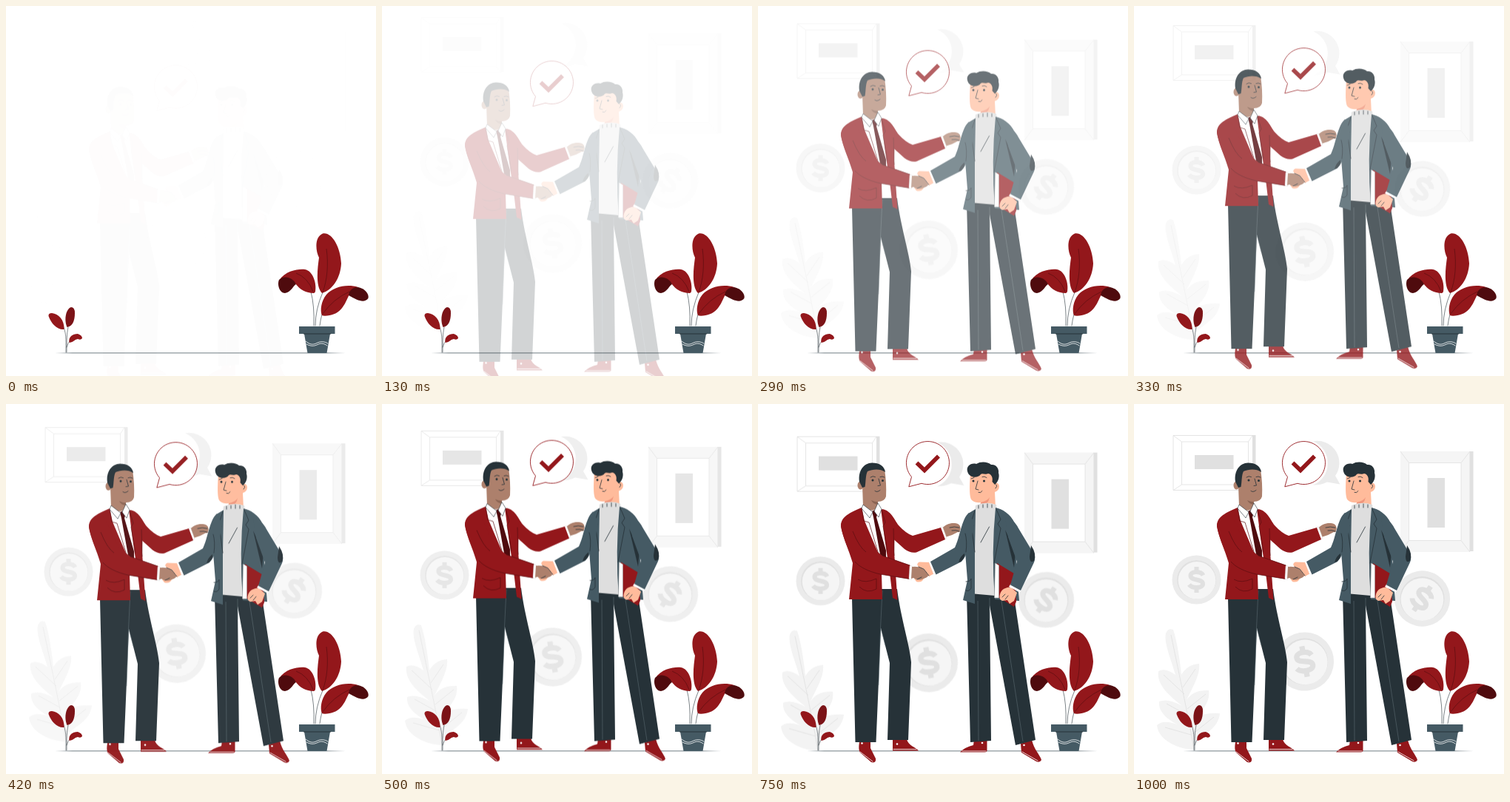
An HTML page for the animation above (1.04 s loop, 500 by 500 pixels).

```html
<!DOCTYPE html>
<html lang="en">
<head>
<meta charset="utf-8">
<title>Handshake</title>
<style>
  html, body { margin: 0; width: 100%; height: 100%; overflow: hidden; background: #fff; }
  svg { display: block; width: 100%; height: 100%; }

  /* The script sets --t, the time in seconds, so both slides follow one clock. */
  .slide {
    animation: slide var(--length) cubic-bezier(.36, -.01, .5, 1.38) calc(var(--t, 0) * -1s) paused both;
  }
  .scenery { --from: -30px; --length: 1s; }
  .people { --from: 30px; --length: .7s; }
  @keyframes slide {
    from { opacity: 0; transform: translateY(var(--from)); }
    to { opacity: 1; transform: translateY(0); }
  }

  .red { fill: #93171b; }
  .deep { fill: #4f0b0e; }
  .dark { fill: #263238; }
  .slate { fill: #455a64; }
  .brown { fill: #ad806c; }
  .peach { fill: #ffbb9b; }
  .white { fill: #fff; }
  .pale { fill: #e0e0e0; }
  .line { fill: none; stroke: #263238; stroke-width: .8; stroke-linecap: round; }
  .seam { fill: none; stroke: #5b6a71; stroke-width: .6; }
  .fold { fill: none; stroke: #5b0e11; stroke-width: .7; }
  .edge { fill: none; stroke: #e0e0e0; stroke-width: .8; }
</style>
</head>
<body>
<svg viewBox="0 0 500 500">
  <defs>
    <g id="dollar" fill="none" stroke="#e0e0e0" stroke-width="6">
      <path d="M9 -6C6-12-8-12-8-5.500C-8 2 8.500-2 8.500 5.500C8.500 12-6 12-10 6.500M0-17.500V-9M0 9V17.500"/>
    </g>
    <g id="coin">
      <circle r="33" fill="#ebebeb"/>
      <circle r="26.3" class="pale"/>
      <circle cx=".5" cy=".8" r="25.3" fill="#f5f5f5"/>
    </g>
  </defs>

  <g class="slide scenery">
    <!-- picture frames -->
    <path class="white" stroke="#e4e4e4" d="M53 42.5H161V116.5H53Z"/>
    <path class="pale" d="M160 42H164.5V116H160Z"/>
    <path class="edge" d="M64.5 51H154.5V109H64.5ZM53 42.5L64.5 51M160 42.5L154.5 51M53 116.5L64.5 109M160 116.5L154.5 109"/>
    <path class="pale" d="M82 69H134.5V88H82Z"/>
    <path fill="#f5f5f5" d="M360 64H454V200H360Z"/>
    <path class="pale" d="M453.5 64H458.5V199H453.5Z"/>
    <path class="white" d="M371.5 79.5H442V184.5H371.5Z"/>
    <path class="edge" d="M371.5 79.5H442V184.5H371.5ZM360 64L371.5 79.5M454 64L442 79.5M360 200L371.5 184.5M454 200L442 184.5"/>
    <path class="pale" d="M396.5 100H420V167H396.5Z"/>

    <path fill="#ebebeb" d="M242 50.3A30 30 0 0 1 272 97L278.5 108.5L261 105.5Q252 110 242 109.5A32 32 0 0 0 242 50.3Z"/>

    <!-- coins -->
    <g transform="translate(84.5 237.5)">
      <use href="#coin"/><use href="#dollar"/>
    </g>
    <g transform="translate(230.5 348) rotate(-10) scale(1.2)">
      <use href="#coin"/><use href="#dollar"/>
    </g>
    <g transform="translate(389.5 263) rotate(35) scale(1.14)">
      <use href="#coin"/><use href="#dollar"/>
    </g>

    <!-- pale plant -->
    <path fill="#f3f3f3" d="M80 467C60 466 33 455 31 434Q42 424 67 437C50 430 32 418 34 402Q46 397 65 408C50 396 30 380 33 361Q42 356 56 366C50 345 40 322 43 310Q46 302 53 305C58 320 62 345 64 366Q72 352 88 351C90 366 78 385 71 400Q80 386 101 387C104 404 88 420 76 430Q90 416 116 418C114 440 92 446 81 460Z"/>
    <path class="edge" d="M81 467C75 430 62 370 50 312M77 447L42 437M73 421L44 405M68 392L40 366M66 383L83 358M72 412L97 392M79 446L108 423"/>
  </g>

  <path fill="#8b969b" d="M66 469L90 468.3H430L459 469L430 469.5H90Z"/>

  <!-- small red plant -->
  <path class="line" stroke-opacity=".7" d="M81 468C81 455 82 445 78 434M82 468C82 450 82 445 84 434M82 461Q84 454 87 452"/>
  <path class="red" d="M78.5 437C69 438 61 429 57.5 419Q57 415 62 415C71 416 79 424 78.5 437Z"/>
  <path fill="#7b1317" d="M82.5 434C78 424 81 409 88 407Q93 407 93 415C93 425 90 433 82.5 434Z"/>
  <path class="red" d="M85.5 455C84 447 90 443 97 443Q103 445 103 449Q101 452 97 450C92 451 92 454 85.5 455Z"/>

  <!-- potted plant -->
  <path class="line" stroke-opacity=".75" d="M416 432Q417 405 412 386M418 432Q418 410 428 387M424 432Q426 415 432 404"/>
  <path class="red" d="M427 388C418 378 421 355 423 340C418 330 417 312 428 307.5C440 305 452 325 453 348C452 368 441 384 427 388Z"/>
  <path class="red" d="M416 388C405 388 397 383 391 375C384 369 372 367 369 371C378 357 396 355 404 356C415 358 420 375 418 386Q417 388 416 388Z"/>
  <path class="deep" d="M369 370C366 377 370 388 377 388C385 387 388 378 392 376C388 367 376 363 369 370Z"/>
  <path class="red" d="M427 418C424 412 426 398 433 390C442 380 460 375 476 380C468 383 464 390 462 394C458 402 453 417 434 418.5Q429 419 427 418Z"/>
  <path class="deep" d="M463 391C464 384 468 380 476 380C485 382 491 389 489.5 395C484 402 475 398 463 391Z"/>
  <path class="fold" d="M428 387C434 370 436 350 433 328M415 386Q408 367 392 361M428 416Q442 396 464 386"/>
  <path class="slate" d="M396 433H444.5V443H396ZM403 443H438L433.5 469H407.5Z"/>
  <path class="dark" d="M402 442.4H439V443.4H402Z"/>
  <path class="line" style="stroke:#fff" d="M405 453C411 458 415 458 420 455.5S430 453 435 456M406 457C412 460 416 460 421 457.5S430 456 434 459"/>

  <g class="slide people">
    <!-- speech bubble -->
    <path class="white" stroke="#93171b" stroke-width=".9" d="M207.5 98.5A29 29 0 1 1 221 107.3L203.8 111.8Z"/>
    <path fill="none" stroke="#93171b" stroke-width="5.6" d="M214.5 79.5L225 89.5L244 70.5"/>

    <!-- man on the left: far arm and legs -->
    <path class="brown" d="M249 168C254 161 265 159.500 271 162.5Q275 166 273 171Q273 174 270 173Q262 178 253 180Z"/>
    <path class="line" stroke-width=".6" d="M259 167Q265 165 272 167M262 171Q267 170 272 172"/>
    <path class="white" stroke="#ccc" stroke-width=".4" d="M246 167L249.5 166L255 181L251.5 184Z"/>
    <path class="red" d="M168 142C180 144 184 156 190 164Q200 175 209 178L247 167L253 183L214 200.5Q206 202 198 196L178 178Z"/>
    <path class="red" d="M137 457C136 463 136 468 138 471L153 484Q160 486 159 479L152 465V456ZM182 453H201C203 462 214 464 217 468.5H182Z"/>
    <path class="line" style="stroke:#fff" d="M138 470L155 483M183 466.5H214"/>
    <path class="dark" d="M127 262L131.5 457H159.5L166 303L178 350L175 454H203L207 349C205 325 193 290 188 250L165 248Z"/>
    <path class="seam" d="M168 252L165.5 303L163 380M166 303L172 326"/>
    <circle class="white" cx="140.5" cy="458.5" r="1.3"/>
    <circle class="white" cx="188" cy="459.5" r="1.3"/>

    <!-- shirt, tie, jacket -->
    <path class="white" d="M141 137L154 146L167 141L174 190L181 250H166L145 160Z"/>
    <path class="deep" d="M154 145L158 143L161.5 148L160 153L173 198L173 210L165 203L156 153Z"/>
    <path class="red" d="M140 140C124 147 112 152 112 165C114 178 123 198 128 215L123 264H168L167 230L164 205L144 158Z"/>
    <path class="red" d="M166 142C176 145 183 152 185 163L184 200L188.5 265L182 262L178 228L172 188Z"/>
    <path class="fold" d="M140 140L143 158L150 160L164 206M167 142L172 160L169 165L175 200M183 168L184 205M135 237Q145 243 160 236V250Q147 257 137 247"/>
    <path class="red" d="M112 165C113 153 122 150 132 152C140 164 146 182 153 193L168 205L206 218L204 236.5L165 230C148 226 137 220 131 213C123 200 115 182 112 165Z"/>
    <path class="fold" d="M128 172Q137 194 146 200M205 236.5L165 230C148 226 137 220 131 213M168 205L205 218"/>

    <!-- head -->
    <path class="brown" d="M144 88H171Q174 108 173 125Q171 132 162 132L162 139Q154 149 142 138L141 110Z"/>
    <path fill="#8b6453" d="M153 130Q160 133 162 132L162 136Q155 135 153 130Z"/>
    <ellipse class="brown" cx="138.500" cy="110" rx="4" ry="5.5"/>
    <path class="dark" d="M141 113L137 105C135 90 143 80 154 79.5C164 79.500 171 84 172 92C165 87 155 88 148 91C145 97 146 105 144.5 112Z"/>
    <path class="line" d="M152 99Q155 96.5 158.5 98.5M165 98.5Q168 97 171 99M163 101L165.5 110L162 110.5M158 117.5Q161 120 165 116.5"/>
    <circle class="dark" cx="155" cy="103" r="1.5"/>
    <circle class="dark" cx="168.5" cy="103.5" r="1.5"/>
    <path class="white" stroke="#263238" stroke-width=".6" d="M142 136L140 141L151 154L155 146ZM162 134L157 145L163 153L167 142Z"/>

    <!-- man on the right: legs -->
    <path class="red" d="M292 454H309.5V469Q308 471 305 470.5H273Q279 464 291 461ZM355 459L370 454C373 467 381 474 383 481Q381 485 376 483L356 471Z"/>
    <path class="line" style="stroke:#fff" d="M276 469H308M357 470L378 482"/>
    <circle class="white" cx="303" cy="458" r="1.3"/>
    <circle class="white" cx="359.5" cy="461" r="1.3"/>
    <path class="dark" d="M282 256L287 457L315 455L313 272L348 461L375 454L346 260L320 252Z"/>
    <path class="seam" d="M297 266L298 455M313 262V290M329 266L358 456"/>

    <!-- sweater, jacket -->
    <path class="peach" d="M287 92C286 108 285 126 289 130Q294 134 301 133L301 140H321L320 119Q326 117 326 111Q325 106 321 107L317 90Z"/>
    <path fill="#f0967c" d="M301 133Q310 131 313 126Q311 137 300 138Z"/>
    <path fill="#dedede" d="M294 137Q308 131 322 136L325 160L320 259L292 256.5L291 160Z"/>
    <path class="line" stroke-width=".6" d="M298 137V141M304 136V140M310 135V140M316 136V140M312.5 166L301 187"/>
    <path class="slate" d="M294 142L284 148L280 200L283 238L277 265L293 270V200Z"/>
    <path class="slate" d="M321 140C330 142 341 148 347 161L350 230L353 266L320 264Q315 200 321 140Z"/>
    <path class="line" stroke-width=".6" d="M293 144L288 160L291 164L289 170L293 200M322 142L328 156L324 162L328 168L319 215M281 240Q287 240 288 236V249Q285 254 281 252"/>
    <path class="dark" d="M334 170L348 200L346 221Z"/>

    <!-- folder and the arm that holds it -->
    <path class="red" d="M323 215L346 229L349 267L346 274L326 262H320Z"/>
    <path class="white" stroke="#999" stroke-width=".5" d="M320.5 215L325.500 218L325.5 262H319.5Z"/>
    <path class="peach" d="M327 257C329 249 338 247 342 248L350 255L346 266L340 270L337 265L330 266Q325 264 327 257Z"/>
    <path class="line" stroke-width=".6" d="M330 261L334 257M334 264L338 259"/>
    <path class="white" d="M339 247L341.5 243L356 251L353.5 254.5Z"/>
    <path class="slate" d="M334 153C342 154 348 160 352 168L373 203Q375.5 208 373 214L355 252L341 244.5L350 213L338 180Z"/>
    <path class="dark" d="M369 191Q377 203 373 212Q367 216 367 206Z"/>

    <!-- head -->
    <path class="dark" d="M283 91C281 84 288 79 295 81C301 77 311 78 315 82C322 81 326 88 325 93C327 99 324 106 320 109L316.500 105C318 98 314 94 311 94C307 96 303 93 301 95C297 101 285 100 283 91Z"/>
    <path class="line" d="M288 101L292 99.5M303 98.5Q306 97 309 99.5M297 104L294 115L298 116M298 119.5Q301 121 303 117.5M322 109Q324 111 321 114"/>
    <circle class="dark" cx="291" cy="104" r="1.5"/>
    <circle class="dark" cx="305.5" cy="104" r="1.5"/>

    <!-- handshake -->
    <path class="white" stroke="#ccc" stroke-width=".4" d="M205 218.5L208.5 219L207.5 237.5L204 236.5Z"/>
    <path class="peach" d="M211 236Q218 232 224 236Q221 242 214 240Z"/>
    <path class="brown" d="M208 220Q216 219 222 222L231 229Q231 234 224 236Q217 240 210 235L207 236Z"/>
    <path class="peach" d="M234 214L218 213.5Q213 216 217 220L224 223L231 233L240 228Z"/>
    <path class="line" stroke-width=".6" d="M217 220L224 223L231 232M215 237L221 234"/>
    <path class="white" d="M231 214L234 212.5L241 230L238 232Z"/>
    <path class="slate" d="M285 147C275 155 273 180 266 194L233 213L240.5 230.5L275 213C283 205 289 185 292 160Z"/>
    <path class="dark" d="M279 202Q280 208 274 213L271 214Q273 206 279 202Z"/>
    <path class="line" stroke-width=".6" d="M280 175Q283 185 281 200"/>
  </g>
</svg>
<script>
  const LOOP = 1040, STEPS = 25, FPS = 24;
  const start = performance.now();

  function draw() {
    const ms = (performance.now() - start) % LOOP;
    let step = Math.min(STEPS - 1, Math.floor((ms + 4) * FPS / 1000));
    if (step > 18 && step < 22) step = 18; // rest at the far point
    document.documentElement.style.setProperty('--t', (step + 1.2) / STEPS);
    requestAnimationFrame(draw);
  }
  draw();
</script>
</body>
</html>
```
